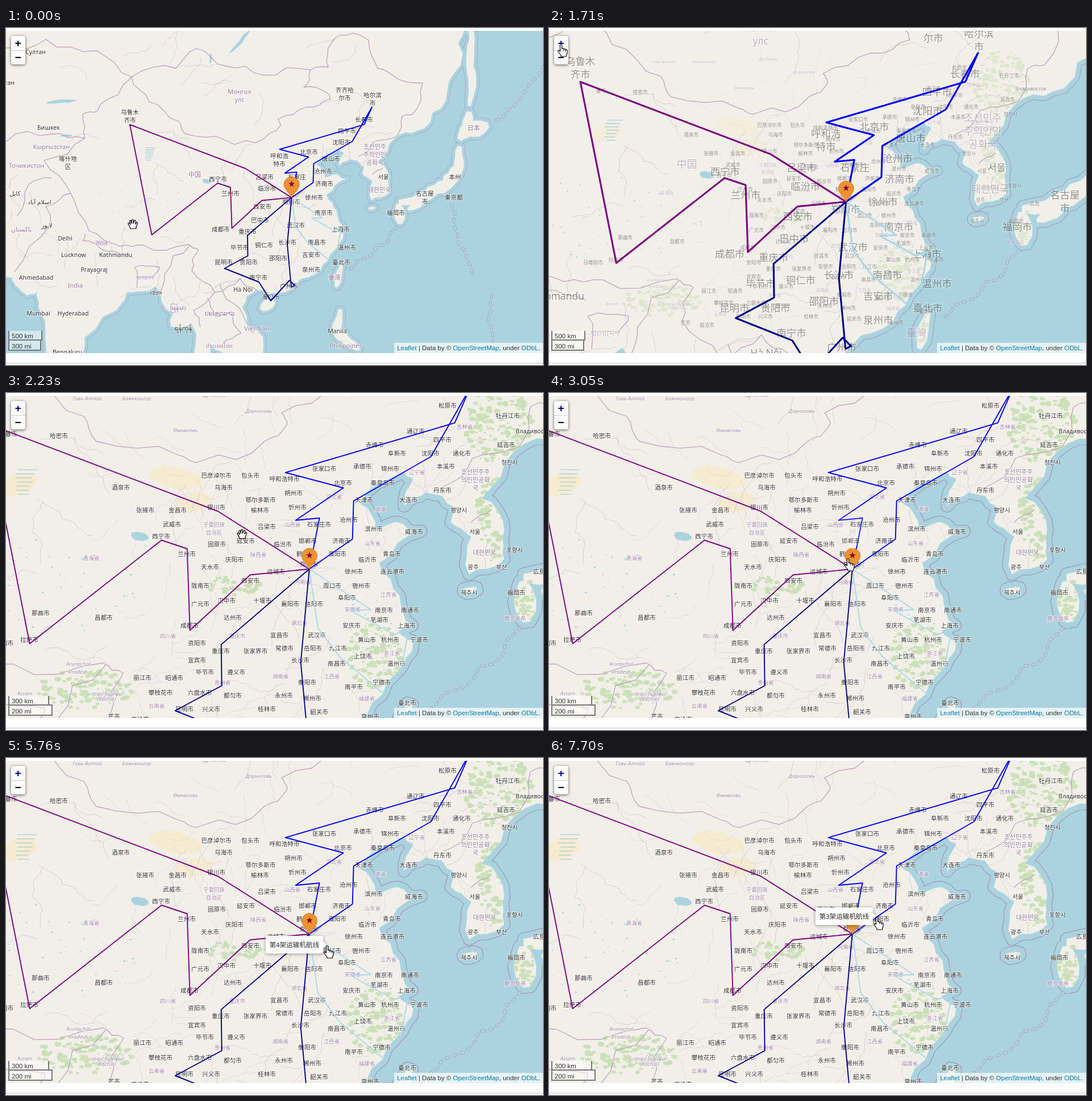
Recreate the animation shown at these times as an HTML page. Size 945x593 px, loop 8000 ms.

```html
<!DOCTYPE html>
<html lang="zh">
<head>
<meta charset="utf-8">
<title>Route map</title>
<style>
html, body { margin: 0; height: 100%; overflow: hidden; background: #fff; }
svg { display: block; width: 945px; height: 593px; font-family: "Noto Sans", "Noto Sans CJK SC", "DejaVu Sans", sans-serif; }
.label { font-size: 10.6px; text-anchor: middle; paint-order: stroke; stroke: #fff; stroke-opacity: .6; stroke-width: 2px; }
.thin { fill: none; vector-effect: non-scaling-stroke; }
.ui { font: 11.5px "Liberation Sans", Arial, sans-serif; fill: #333; }
.button { font: bold 19px "Liberation Mono", monospace; text-anchor: middle; }
.link { fill: #0078a8; }
.bubble { filter: drop-shadow(0 1px 3px rgba(0,0,0,.4)); }
</style>
</head>
<body>
<svg id="stage" viewBox="0 0 945 593"></svg>
<script>
let seed = 7;
const random = () => (seed = (seed * 16807) % 2147483647) / 2147483647;
const points = text => text.trim().split(/\s+/).map(p => p.split(',').map(Number));
const path = (list, end = '') => 'M' + list.map(p => p.map(v => v.toFixed(1))).join('L') + end;

// Roughens a polyline by midpoint displacement.
function wiggle(list, amount = .16, rounds = 2) {
  for (let i = 0; i < rounds; i++) {
    list = list.flatMap((p, k) => {
      const q = list[k + 1];
      if (!q) return [p];
      const d = (random() - .5) * 2 * amount;
      return [p, [(p[0] + q[0]) / 2 + (q[1] - p[1]) * d, (p[1] + q[1]) / 2 - (q[0] - p[0]) * d]];
    });
  }
  return list;
}
const rough = (text, end) => path(wiggle(points(text)), end);

// A long island or lake: a spine with rounded, tapering sides.
function ribbon(spine, width) {
  const line = wiggle(points(spine), .06), last = line.length - 1;
  const side = sign => line.map(([x, y], i) => {
    const a = line[Math.max(0, i - 1)], b = line[Math.min(last, i + 1)];
    const length = Math.hypot(b[0] - a[0], b[1] - a[1]);
    const w = sign * width * Math.sqrt(Math.sin(Math.PI * (.04 + .92 * i / last))) * (.8 + .4 * random()) / length;
    return [x - (b[1] - a[1]) * w, y + (b[0] - a[0]) * w];
  });
  return path([...side(1), ...side(-1).reverse()], 'Z');
}

// Geography, in pixels of the wide zoom level.
const pacificCoast = `806,-10 800,65 774,128 736,177 692,188 663,226 654,236 674,265 674,290 643,303 645,270 627,257 630,244
  605,231 586,243 594,219 585,213 547,241 561,263 580,257 601,265 564,293 582,322 593,348 581,353 594,362 579,390 553,427 510,451
  467,466 464,475 460,464 441,461 416,491 452,543 456,600`;
const indianCoast = `381,600 381,571 359,556 351,600 337,600 326,520 291,526 294,503 263,455 211,466 209,478 138,545 136,600
  81,600 57,491 56,463 37,471 21,457 10,439 -20,423 -20,-20`;
const islands = [
  ribbon('472,481 449,496', 9), ribbon('591,417 581,456', 6), ribbon('588,495 582,532 600,552 622,566', 9),
  ribbon('691,309 694,345', 9), ribbon('707,319 734,308', 6), ribbon('691,306 742,295 775,276 797,245 798,208', 11),
  ribbon('798,197 810,180 815,147', 10), ribbon('808,185 849,171', 13), ribbon('818,-10 817,45 820,90 815,137', 7), ribbon('638,317 650,316', 3)
].join('');
const land = rough(`${pacificCoast} ${indianCoast}`, 'Z') + islands;
const chains = ['862,163 905,124 945,68', '688,350 672,376 640,402 606,424', '783,310 796,380 822,436', '855,470 850,520 856,552'].map(c => rough(c)).join('');

const nations = [
  '221,86 252,130 304,164 315,186 387,198 408,203 463,186 483,171 478,161 529,139 571,125 569,117 524,104 536,74',
  '221,86 299,71 335,36 387,67 452,83 536,74 567,69 572,27 610,9 638,21 654,71 690,90 733,97 715,152 697,156 687,191',
  '687,191 646,201 620,226', '645,257 663,246',
  '221,86 198,117 161,146 135,152 139,194 67,233 114,291 146,357 201,384 242,382 321,381 339,390 327,427 367,465 412,441 441,461',
  '140,362 135,374 179,393 224,404', '114,291 70,314 77,347 15,429', '324,382 279,433 272,463', '230,456 226,421 270,421 259,439',
  '367,465 330,497 342,526', '354,475 367,507 397,499 414,537 381,554', '376,451 412,494 436,537', '221,86 160,40 70,20 0,35', '139,194 80,187 0,200', '80,264 40,275 20,330'
].map(n => rough(n)).join('');
const lakes = ribbon('394,44 428,5', 3) + ribbon('359,62 361,45', 2) + ribbon('72,132 123,127', 3) + ribbon('95,190 117,189', 2) + ribbon('346,268 361,271', 4);

// Winding administrative lines, scattered over a box.
const borders = (count, x0, y0, w, h, step) => Array.from({ length: count }, () => {
  let x = x0 + random() * w, y = y0 + random() * h, turn = random() * 6.283;
  return path(wiggle(Array.from({ length: 5 }, () => {
    turn += (random() - .5) * 1.6;
    return [x += Math.cos(turn) * step, y += Math.sin(turn) * step];
  })));
}).join('');
const provinces = borders(70, 0, 20, 690, 480, 15);
const counties = borders(110, 330, 150, 300, 290, 8);

const scatter = (count, x, y, rx, ry, size, color) => Array.from({ length: count }, () => {
  const a = random() * 6.283, d = Math.sqrt(random()), r = size * (.4 + random());
  return `<ellipse cx="${(x + Math.cos(a) * d * rx).toFixed(1)}" cy="${(y + Math.sin(a) * d * ry).toFixed(1)}" rx="${r.toFixed(1)}" ry="${(r * .65).toFixed(1)}" fill="${color}"/>`;
}).join('');
const ponds = scatter(90, 245, 315, 110, 45, .8, '#aad3df') + scatter(30, 560, 325, 22, 30, .7, '#aad3df');
const forest = (x, y, rx, ry) => scatter(Math.round(rx * ry * .16), x, y, rx, ry, 2.3, '#cbe0b8');
const forests = forest(670, 172, 30, 36) + forest(663, 255, 14, 38) + forest(437, 313, 24, 9) + forest(560, 375, 26, 28)
  + forest(305, 404, 42, 17) + forest(695, 325, 15, 18) + forest(584, 436, 6, 18);
const deserts = ribbon('362,214 408,222', 9) + ribbon('384,244 416,238', 9) + ribbon('230,228 262,219', 10);
const hatch = Array.from({ length: 7 }, (_, i) => `M${246 - i % 3},${211 + i * 3.6}h${17 - i * 1.2}`).join('');

// Labels are listed by line of latitude: "y: text x, text x". A bar breaks the text.
const labels = (text, color = '#333', size = 10.6) => text.trim().split('\n').map(line => {
  const [y, row] = line.trim().split(': ');
  return row.split(', ').map(entry => {
    const [, words, x] = entry.match(/^(.+) (-?\d+)$/);
    return words.split('|').map((w, i) => `<text class="label" style="font-size:${size}px" fill="${color}" x="${x}" y="${+y + 4 + i * 14}">${w}</text>`).join('');
  }).join('');
}).join('');
const lilac = '#97789f';
const wideLabels = labels(`42: Султан 52
  96: тан 6
  109: 齐齐哈|尔市 596
  118: 哈尔滨|市 645
  148: 乌鲁木|齐市 218
  161: 长春市 630
  175: Бишкек 75
  181: 四平市 600
  201: 沈阳市 590
  218: 北京市 533
  225: 呼和浩|特市 481
  230: 喀什地|区 109, 唐山市 572
  252: 沧州市 558
  262: 吕梁市 455, 石家庄 512, 서울 664, 本州 790
  266: 西宁市 373
  274: 济南市 560
  282: 临汾市 459
  291: 兰州市 395, کابل 16, 名古屋|市 737
  298: 徐州市 542, 東京都 788
  306: 郑州市 502, اسلام آباد 59
  314: 西安市 451
  325: 南京市 559, 福岡市 686
  338: 巴中市 447
  347: لاہور 72, 武汉市 510
  354: 成都市 378, 上海市 589
  358: 重庆市 425
  370: Delhi 104
  377: 长沙市 495, 南昌市 547
  382: 铜仁市 454
  386: 毕节市 411, 温州市 600
  399: Lucknow 119, Kathmandu 193, 吉安市 537
  405: 邵阳市 479
  412: 昆明市 383, 贵阳市 427, 臺北市 590
  425: Prayagraj 155, 泉州市 537
  439: Ahmedabad 53, 南宁市 444
  454: 广州市 498
  460: Hà Nội 417
  466: চট্টগ্রাম 264
  473: 海口市 466
  502: Mumbai 57, Hyderabad 118
  528: ရန်ကုန် 312
  533: Manila 583
  570: Bengaluru 108`)
  + labels(`112: Монгол|улс 411
  176: 日本 823
  209: Кыргызстан 80, 조선민주|주의인민|공화국 649
  242: Точикистон 36
  258: 中国 332
  285: 대한민국 657
  354: پاکستان 27
  379: नेपाल 168
  439: বাংলাদেশ 244, 臺灣 578
  453: India 122
  492: မြန်မာ 303
  502: ປະເທດລາວ 376
  529: Việt Nam 443
  559: ประเทศไทย 375, Philippines 598`, lilac, 11);
const closeLabels = labels(`22: 松原市 777
  40: 牡丹江市 883
  67: 通辽市 721, Владивосток 930
  72: 番市 9
  75: 哈密市 93
  82: 四平市 768
  91: 延吉市 880, 赤峰市 649
  106: 阜新市 688, 沈阳市 747, 通化市 802
  122: 청진시 886
  129: 承德市 627, 本溪市 774
  133: 张家口市 560, 锦州市 676
  145: 巴彦淖尔市 370, 包头市 430
  151: 呼和浩特市 490
  158: 北京市 593, 秦皇岛市 663
  166: 酒泉市 202, 乌海市 383
  171: 丹东市 768
  176: 朔州市 506
  188: 鄂尔多斯市 448, 天津市 630, 大连市 708
  201: 银川市 370, 忻州市 513
  206: 张掖市 245, 金昌市 302, 榆林市 447, 평양시 797
  223: 沧州市 603
  231: 石家庄市 551, 武威市 292
  235: 吕梁市 459
  239: 滨州市 647
  244: 威海市 718, 서울 825
  252: 西宁市 273
  260: 延安市 422, 邯郸市 531, 济南市 590
  266: 临汾市 487, 固原市 371
  276: 포항시 895
  283: 兰州市 318, 鹤壁市 527, 濮阳市 583, 青岛市 679
  293: 庆阳市 402, 临沂市 636
  301: 郑州市 533
  306: 天水市 359, 광주 822, 부산 872
  314: 运城市 475, 徐州市 612, 连云港市 680, 広島 938
  330: 西安市 430
  339: 陇南市 342, 周口市 574, 宿州市 625
  351: 제주시 815, 福岡市 898
  360: 阜阳市 600
  365: 汉中市 388, 十堰市 451
  371: 广元市 342, 襄阳市 500, 信阳市 542
  382: 南京市 665, 南通市 711
  387: 那曲市 61
  395: 昌都市 172, 达州市 399
  399: 芜湖市 657
  409: 成都市 323, 安庆市 608, 上海市 705
  426: 宜昌市 481, 武汉市 547
  434: 拉萨市 41, 黄山市 635, 杭州市 676, 宁波市 727
  440: 日喀则市 -8, 资阳市 336
  454: 重庆市 378, 张家界市 439
  449: 常德市 490, 岳阳市 540, 九江市 584
  463: 上饶市 628
  470: 宜宾市 336, 长沙市 518
  476: 南昌市 582, 温州市 687
  491: 毕节市 350, 遵义市 405
  501: 昭通市 296, 丽江市 240
  509: 衡阳市 530, 宁德市 661
  517: 南平市 612
  527: 六盘水市 341, 攀枝花市 272
  532: 都匀市 399, 永州市 489
  537: 郴州市 539
  545: 臺北市 706
  556: 昆明市 314, 兴义市 361, 桂林市 459
  561: 韶关市 551
  569: 芒市 190, 泉州市 641
  574: 临沧市 236`)
  + labels(`59: 吉林省 807
  139: 辽宁省 723
  182: 河北省 577
  231: 山西省 504, 宁夏回族|自治区 366
  264: 山东省 645
  284: 陕西省 444
  290: 青海省 150
  332: 河南省 522
  354: 江苏省 673
  380: 安徽省 610
  396: 鹿児島県 896
  404: 湖北省 516
  427: 四川省 285, 重庆市 407
  457: 浙江省 679
  498: 湖南省 483, 江西省 573
  509: 贵州省 381
  537: 福建省 635
  550: 云南省 265`, '#a585ac', 9.5)
  + labels(`139: 조선민주주|의인민공화|국 826
  281: 대한민국 842`, lilac, 11)
  + `<g font-style="italic">${labels(`9: Говь-Алтай 143, Баянхонгор 230
  3: Дундговь 367
  31: Дорноговь 445
  65: Өмнөговь 316
  204: 渤海 658
  476: Arunachal|Pradesh 127
  528: Assam 33, ကချင်ပြည်နယ် 178
  538: (Kachin) 177`, '#a08aa8', 9.3)}</g>`;

const hub = '502.5,298.4';
const routes = [
  ['#add8e6', '510,350 529.5,376 569,409 583,388 590,352 577,356 539,335 556.5,334'],
  ['blue', '540.5,272 541.5,238.5 609.5,199.5 644,139 630.5,169.8 481.5,213.5 532.5,227 490.5,255.5 511.5,253.5'],
  ['purple', '422,247.5 218,170 256.5,364 372.5,273 395,280.5 397.5,352.4 450.5,303.5'],
  ['#00008b', '425,364.8 425.5,401 384.5,423 445,447 466,480 499,444 508,453 502,456 495,380.5']
].map(([color, stops]) => `<polygon points="${hub} ${stops}" stroke="${color}"/>`).join('');

const star = Array.from({ length: 10 }, (_, i) => {
  const r = i % 2 ? 2.5 : 6, a = i * Math.PI / 5;
  return `${(r * Math.sin(a)).toFixed(1)},${(-24 - r * Math.cos(a)).toFixed(1)}`;
}).join(' ');

document.getElementById('stage').innerHTML = `
<clipPath id="view"><rect y="5" width="945" height="567"/></clipPath>
<clipPath id="shore"><path d="${land}"/></clipPath>
<rect width="945" height="593" fill="#fff"/>
<g clip-path="url(#view)">
  <rect width="945" height="593" fill="#aad3df"/>
  <g id="world" stroke-linejoin="round">
    <path d="${land}" fill="none" stroke="#a394b5" stroke-width="11.2"/>
    <path d="${land}" fill="none" stroke="#aad3df" stroke-width="10"/>
    <g stroke-dasharray="5 9" stroke-linecap="round">
      <path d="${chains}" class="thin" stroke="#a394b5" stroke-width="5"/>
      <path d="${chains}" class="thin" stroke="#b4d6df" stroke-width="3.5"/>
    </g>
    <path d="${land}" fill="#f2efe9"/>
    <g clip-path="url(#shore)">
      <g id="detail"><path d="${deserts}" fill="#f6ebd0"/>${forests}<path d="${counties}" class="thin" stroke="#d9cdd3" stroke-width=".7"/></g>
      <path d="${provinces}" class="thin" stroke="#d3c2d0" stroke-width=".8"/>
      <path d="${lakes}" fill="#aad3df"/>${ponds}
      <path d="${hatch}" class="thin" stroke="#8fc4d4"/>
    </g>
    <path d="${nations}" class="thin" stroke="#bda3be" stroke-width="1.3"/>
  </g>
  <g id="wide">${wideLabels}</g>
  <g id="close">${closeLabels}</g>
  <g id="routes" fill="none" stroke-linejoin="round">${routes}</g>
  <g id="marker">
    <path d="M2,0L16,-13L22,-12L8,0Z" opacity=".15"/>
    <path d="M0,0C-3,-8 -13.5,-14 -13.5,-23.5A13.5,13 0 0 1 13.5,-23.5C13.5,-14 3,-8 0,0Z" fill="#ee9231" stroke="#d27f26"/>
    <polygon id="star" points="${star}"/>
  </g>
  <rect x="9" y="14" width="25" height="50" rx="4" fill="#fff" style="filter:drop-shadow(0 1px 2.5px rgba(0,0,0,.65))"/>
  <path d="M9,39.5h25" stroke="#ccc"/>
  <text id="plus" class="button" x="21.3" y="33">+</text><text class="button" x="21.3" y="58">−</text>
  <path id="scaleBoxes" fill="#fff" fill-opacity=".5" stroke="#777" stroke-width="2"/>
  <text id="km" class="ui" x="10" y="546"/><text id="mi" class="ui" x="10" y="564"/>
  <rect x="683" y="554" width="262" height="18" fill="#fff" opacity=".7"/>
  <text class="ui" x="940" y="567" text-anchor="end"><tspan class="link">Leaflet</tspan> | Data by © <tspan class="link">OpenStreetMap</tspan>, under <tspan class="link">ODbL</tspan>.</text>
  <g id="popup">
    <path class="bubble" d="M521,208.5h27a12,12 0 0 1 12,12v34a12,12 0 0 1 -12,12h-4l-10,11l-10,-11h-3a12,12 0 0 1 -12,-12v-34a12,12 0 0 1 12,-12z" fill="#fff"/>
    <g font-size="12" text-anchor="middle" fill="#333"><text x="534" y="234">郑</text><text x="534" y="249">州</text></g>
    <path d="M546,217l6,6m0,-6l-6,6" stroke="#aaa" stroke-width="1.8"/>
  </g>
  <g id="tooltip" opacity=".94">
    <path class="bubble" d="M3,0h95a3,3 0 0 1 3,3v7l6,5.5l-6,5.5v7a3,3 0 0 1 -3,3h-95a3,3 0 0 1 -3,-3v-25a3,3 0 0 1 3,-3z" fill="#fff"/>
    <text id="tip" x="50.3" y="19.8" font-size="11.6" text-anchor="middle" fill="#222"/>
  </g>
</g>
<path d="M0,589.5h945" stroke="#ccc"/><rect y="590" width="945" height="3" fill="#f7f7f7"/>
<circle id="click" r="11.5" fill="#f0ec28" opacity=".75"/>
<g id="cursor" fill="#fff" stroke="#000" stroke-width="1.2" stroke-linejoin="round">
  <path id="pointer" d="M-1.5,1.5Q0,-1 1.7,1.5V8.5Q4,7 5,9Q7.5,8 8.2,10Q11,9.5 11,12V16Q11,18 9.5,20V22H0V20L-5,13.5Q-5.5,10.5 -3,11.5L-1.5,13ZM5,9V12M8.2,10V13"/>
  <path id="grab" d="M-4.5,8V6L-8,0Q-8.5,-2.5 -6,-1.5L-4,1L-5.5,-5Q-4.5,-7.5 -3,-5.5L-1.7,-1V-7Q0,-9 1.2,-7V-1L3,-6Q5,-7.5 5.5,-5L4.8,0L6.5,-2.5Q8.5,-3.5 8.5,-1L6,5V8Z"/>
</g>`;

const $ = id => document.getElementById(id);
const clamp = v => Math.min(1, Math.max(0, v));
const set = (id, attributes) => { for (const k in attributes) $(id).setAttribute(k, attributes[k]); };
const show = (id, on) => set(id, { visibility: on ? 'visible' : 'hidden' });
const within = (t, from, to) => t >= from && t < to;

// Cursor moves: start, end, x, y
const moves = [[290, 1070, 21, 28], [1900, 2300, 449, 267], [2350, 2600, 526, 291], [3230, 3680, 553, 240],
  [3860, 4150, 549, 219], [4680, 5440, 559, 327], [5690, 5760, 565, 330], [6500, 6830, 563, 288], [7010, 7700, 577, 280]];
const cursorAt = t => moves.reduce(([x, y], [from, to, nextX, nextY]) => {
  const u = clamp((t - from) / (to - from)), e = u * u * (3 - 2 * u);
  return [x + (nextX - x) * e, y + (nextY - y) * e];
}, [223, 345]);

// cubic-bezier(0, 0, .25, 1)
function zoomEase(x) {
  let low = 0, high = 1;
  for (let i = 0; i < 20; i++) {
    const u = (low + high) / 2;
    if (.75 * u * u + .25 * u ** 3 < x) low = u; else high = u;
  }
  return 3 * low * low - 2 * low ** 3;
}

function draw(t) {
  const zoomed = t >= 1862, zoom = 1 + zoomEase(clamp((t - 1640) / 222));
  const closeness = clamp((t - 1660) / 100);
  const place = s => `translate(471.3 287) scale(${s}) translate(-471.3 -287)`;
  set('world', { transform: place(zoom) });
  set('wide', { transform: place(zoom), opacity: 1 - closeness });
  set('close', { transform: place(zoom / 2), opacity: closeness });
  set('detail', { opacity: closeness });
  set('routes', { transform: place(zoom), 'stroke-width': zoomed ? .95 : 1.9 });
  set('marker', { transform: `translate(${471.3 + zoom * 31.4} ${287 + zoom * 11.4})` });
  set('star', { fill: t < 2600 ? '#7d0a5c' : '#8b0000' });
  set('plus', { fill: t < 1070 ? '#000' : t < 1640 ? '#555' : '#00008b' });

  const [km, mi] = zoomed ? [75, 81] : [63, 61];
  set('scaleBoxes', { d: `M5,533V549H${km}V533M5,549V567H${mi}V549${km < mi ? 'H5' : ''}` });
  $('km').textContent = zoomed ? '300 km' : '500 km';
  $('mi').textContent = zoomed ? '200 mi' : '300 mi';

  const [x, y] = cursorAt(t);
  const onMap = t < 980 || within(t, 1950, 2540) || within(t, 4780, 5260) || within(t, 6540, 7090);
  set('cursor', { transform: `translate(${x} ${y})` });
  show('grab', onMap);
  show('pointer', !onMap);

  show('click', within(t, 1520, 1640) || within(t, 2910, 3020) || within(t, 4360, 4490));
  set('click', { cx: x, cy: y + 1 });

  const fade = t < 4490 ? clamp((t - 3020) / 200) : 1 - clamp((t - 4490) / 125);
  show('popup', fade > 0);
  set('popup', { opacity: fade });

  const fourth = within(t, 5260, 6540);
  show('tooltip', fourth || t >= 7090);
  set('tooltip', { transform: `translate(${x - 108} ${y - 17})` });
  $('tip').textContent = `第${fourth ? 4 : 3}架运输机航线`;
}

const start = performance.now();
function frame() {
  draw((performance.now() - start) % 8000);
  requestAnimationFrame(frame);
}
frame();
</script>
</body>
</html>
```
